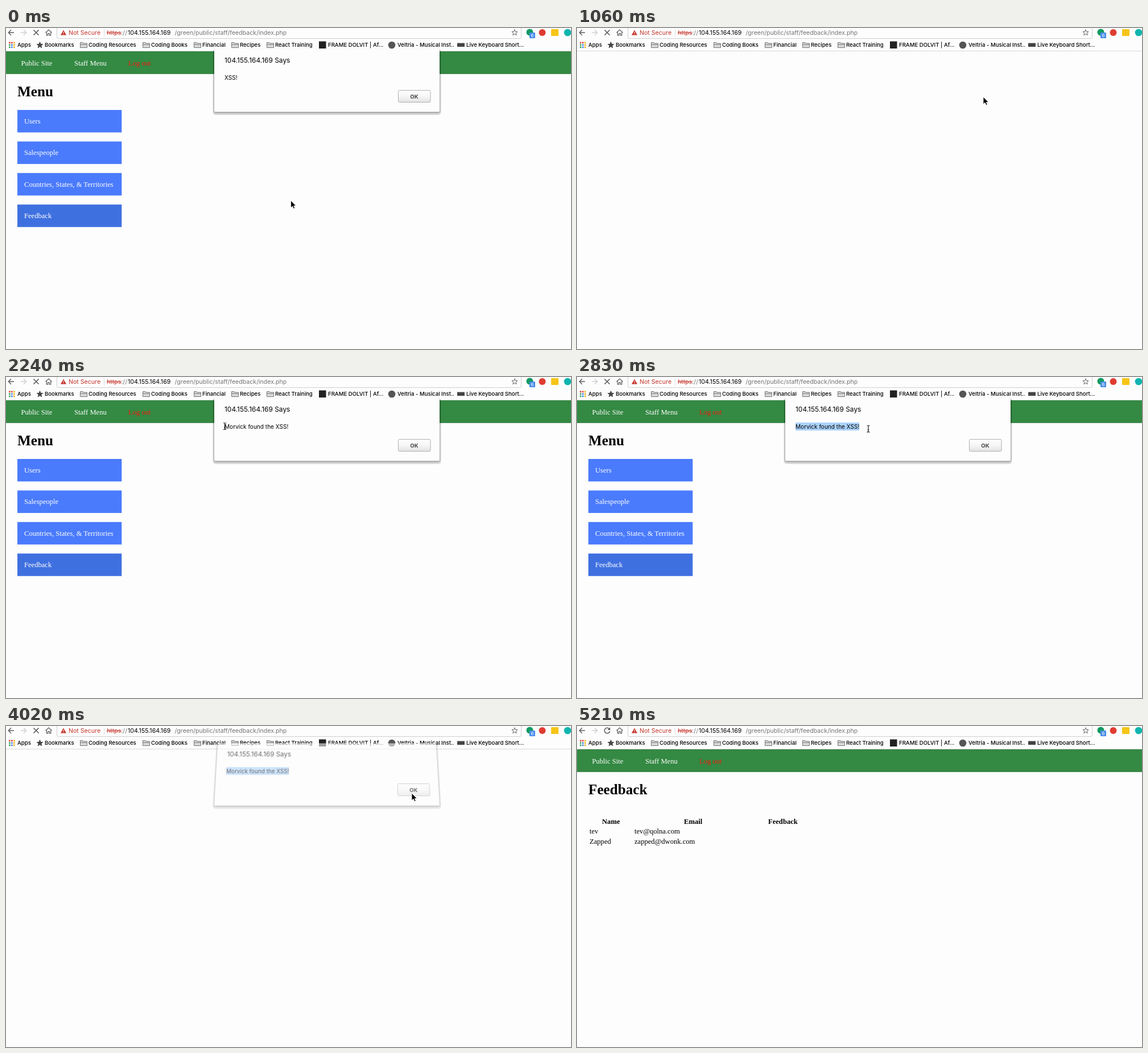
Animation, 993 px wide and 564 px high, one loop 6.12 s. Source, as an HTML page:

```html
<!DOCTYPE html>
<html lang="en">
<head>
<meta charset="utf-8">
<title>Script alert demo</title>
<style>
  html, body { margin: 0; width: 993px; height: 564px; overflow: hidden; background: #fdfdfd; }
  svg { position: absolute; left: 0; top: 0; overflow: hidden; }
  text { white-space: pre; }
  .ui { font-family: Inter, Roboto, sans-serif; }
  .serif { font-family: "Liberation Serif", "Times New Roman", serif; font-size: 12.6px; }
  .bold { font-weight: 700; }
  .title { font-size: 25.2px; font-weight: 700; }
  .mark { font-size: 9.6px; font-weight: 500; }
  .url { font-size: 10.6px; }
  #sheet { left: 356px; top: 27px; transform-origin: 208px 120px; }
</style>
</head>
<body>
<svg id="page" width="993" height="564" viewBox="0 0 993 564"></svg>
<svg id="sheet" width="416" height="136" viewBox="356 27 416 136">
  <defs>
    <linearGradient id="face" x1="0" y1="0" x2="0" y2="1">
      <stop offset="0" stop-color="#fefefe"/>
      <stop offset=".5" stop-color="#f6f6f6"/>
      <stop offset="1" stop-color="#e2e2e2"/>
    </linearGradient>
    <filter id="soft" x="-5%" y="-10%" width="110%" height="125%"><feGaussianBlur stdDeviation="1.6"/></filter>
  </defs>
  <rect x="363.5" y="37" width="401" height="116" rx="5" fill="#000" opacity=".13"/>
  <rect x="366" y="39" width="396" height="109.5" rx="2" fill="#000" opacity=".5" filter="url(#soft)"/>
  <rect x="366" y="37" width="396" height="110.5" rx="2" fill="#fdfdfd"/>
  <g class="ui">
    <text x="384" y="61" font-size="11.95">104.155.164.169 Says</text>
    <rect id="selection" x="384" y="80" height="14" fill="#abd2fb"/>
    <text id="message" x="384" y="91" font-size="10.1"></text>
    <rect x="689.5" y="109.5" width="56.5" height="21" rx="2" fill="url(#face)" stroke="#b0b0b0"/>
    <text id="ok" x="717.5" y="124" font-size="9.6" class="bold" text-anchor="middle">OK</text>
  </g>
</svg>
<svg id="pointer" width="993" height="564" viewBox="0 0 993 564">
  <path id="arrow" d="M0 0V13L3 10.2L5.1 14.6L7.3 13.6L5.3 9.4H9.3Z" fill="#000" stroke="#fff" stroke-width=".9"/>
  <path id="beam" d="M-2.6 -6Q-.4 -6 0 -4.8Q.4 -6 2.6 -6M0 -5V5M-2.6 6Q-.4 6 0 4.8Q.4 6 2.6 6M-1.5 2H1.5" fill="none" stroke="#222" stroke-width="1.2"/>
</svg>
<script>
const LOOP = 6120, STEP = 149;
const $ = id => document.getElementById(id);
const show = (id, on) => { $(id).style.display = on ? "" : "none"; };

const text = (x, y, cls, str, fill = "#000") =>
  `<text x="${x}" y="${y}" class="${cls}" fill="${fill}">${str.replace(/&/g, "&amp;")}</text>`;
const rect = (x, y, w, h, fill, extra = "") =>
  `<rect x="${x}" y="${y}" width="${w}" height="${h}" fill="${fill}" ${extra}/>`;
const dot = (x, y, r, fill) => `<circle cx="${x}" cy="${y}" r="${r}" fill="${fill}"/>`;
const line = (d, color, width = 1.4) =>
  `<path d="${d}" fill="none" stroke="${color}" stroke-width="${width}"/>`;

function star(cx, cy, r, fill, stroke) {
  const points = Array.from({ length: 10 }, (_, i) => {
    const a = i * Math.PI / 5, d = i % 2 ? r * 0.42 : r;
    return `${(cx + d * Math.sin(a)).toFixed(1)},${(cy - d * Math.cos(a)).toFixed(1)}`;
  });
  return `<polygon points="${points.join(" ")}" fill="${fill}" stroke="${stroke}"/>`;
}

const folder = x =>
  `<path d="M${x + .5} 34.5V25.5H${x + 5}L${x + 6.2} 27H${x + 12.5}V34.5Z" fill="#d8d8d8" stroke="#777"/>` +
  line(`M${x + 1} 29H${x + 12}`, "#777", 1);

function toolbar() {
  const gray = "#5a5a5a";
  const appColors = ["#e0473a", "#e0473a", "#f2b51d", "#3aa757", "#4285f4", "#f2b51d", "#3aa757", "#4285f4", "#f2b51d"];
  const folders = [[130, "Coding Resources"], [240, "Coding Books"], [330, "Financial"], [396, "Recipes"], [458, "React Training"]];
  return rect(0, 0, 993, 41, "#fdfdfd") + rect(0, 40, 993, 1, "#d9d9d9") +
    line("M14 8H4.5M9 3.2L4.3 8L9 12.8", gray) +
    line("M26 8H35.5M31 3.2L35.7 8L31 12.8", "#cfcfcf") +
    `<g id="stop">${line("M48.5 3.5L57.5 12.5M57.5 3.5L48.5 12.5", gray, 1.6)}</g>` +
    `<g id="reload">${line("M57 5.2A4.8 4.8 0 1 0 57.8 9", gray, 1.5)}<path d="M58.3 2.2V7H53.5Z" fill="${gray}"/></g>` +
    line("M69.5 8.2L75 3L80.5 8.2M71.3 7.5V12.8H73.7V9.5H76.3V12.8H78.7V7.5", gray, 1.2) +
    line("M89.5 0V16Q89.5 18.5 92 18.5H903Q905.5 18.5 905.5 16V0", "#cfcfcf", 1) +
    `<path d="M101 3.5L106 12.5H96Z" fill="#c5352b"/>` + rect(100.5, 6.5, 1, 3, "#fff") + rect(100.5, 10.3, 1, 1, "#fff") +
    text(110, 12, "ui url", "Not Secure", "#c5352b") + rect(172, 2, 1, 13, "#ddd") +
    `<text x="177" y="12" class="ui url" fill="#777"><tspan fill="#c5352b" text-decoration="line-through">https</tspan>://</text>` +
    text(214, 12, "ui url", "104.155.164.169") +
    text(296.5, 12, "ui url", "/green/public/staff/feedback/index.php", "#757575") +
    star(894, 8.2, 5.4, "none", "#666") +
    dot(920.5, 7.5, 6, "#129a63") + rect(920, 8, 10, 10, "#4a8ee8", 'rx="1"') +
    `<text x="925" y="16" class="ui" font-size="8" fill="#fff" text-anchor="middle">6</text>` +
    dot(942.5, 8, 6, "#e03c31") + rect(958, 2, 13, 12, "#f5c518", 'rx="1"') + dot(987, 8, 6.3, "#0fb5ae") +
    appColors.map((c, i) => rect(5 + i % 3 * 4, 24.5 + Math.floor(i / 3) * 4, 2.7, 2.7, c)).join("") +
    text(20, 33.3, "ui mark", "Apps") +
    star(59.5, 30.2, 5.6, "#444", "#444") + text(68, 33.3, "ui mark", "Bookmarks") +
    folders.map(([x, name]) => folder(x) + text(x + 15, 33.3, "ui mark", name)).join("") +
    rect(550, 23.5, 12.5, 12.5, "#222") + text(566, 33.3, "ui mark", "FRAME DOLVIT | Af...") +
    dot(678, 30, 6.3, "#555") + text(688, 33.3, "ui mark", "Veltria - Musical Inst..") +
    rect(793, 26.5, 13, 6.5, "#444") + text(809, 33.3, "ui mark", "Live Keyboard Short...");
}

function siteHeader() {
  return rect(0, 41, 993, 39.5, "#348943") + rect(0, 80, 993, 1, "#2f7a3c", 'opacity=".7"') +
    text(26.5, 66, "serif", "Public Site", "#fff") +
    text(120, 66, "serif", "Staff Menu", "#fff") +
    text(215, 66, "serif", "Log out", "#f21a0c");
}

function menu() {
  const items = ["Users", "Salespeople", "Countries, States, & Territories", "Feedback"];
  return text(20, 120, "serif title", "Menu") + items.map((name, i) => {
    const y = 144 + i * 55.4;
    return rect(20, y, 183.3, 39.5, i === 3 ? "#3f70e0" : "#4a7bfc") + text(32, y + 23.8, "serif", name, "#fff");
  }).join("");
}

function feedback() {
  const heads = [[44, "Name"], [188, "Email"], [336, "Feedback"]];
  const rows = [["tev", "tev@qolna.com"], ["Zapped", "zapped@dwonk.com"]];
  return text(20, 120, "serif title", "Feedback") +
    heads.map(([x, name]) => text(x, 171.7, "serif bold", name)).join("") +
    rows.map(([name, mail], i) => {
      const y = 189.2 + i * 17.4;
      return text(22, y, "serif", name) + text(101, y, "serif", mail);
    }).join("");
}

$("page").innerHTML = rect(0, 0, 993, 564, "#fdfdfd") + toolbar() +
  `<g id="header">${siteHeader()}</g><g id="menu">${menu()}</g><g id="feedback">${feedback()}</g>`;

const smooth = p => p * p * (3 - 2 * p);
const easeIn = p => p ** 1.5;

// Each move: start, end, target x, target y, easing
const moves = [
  [0, 745, 714, 121, smooth],
  [1192, 2235, 384.5, 86.5, smooth],
  [2384, 2831, 512, 91, smooth],
  [3278, 3874, 713, 118, smooth],
  [4470, 5066, 967, 549, easeIn]
];

function pointerAt(t) {
  let x = 500.5, y = 303;
  for (const [start, end, tx, ty, ease] of moves) {
    const p = ease(Math.min(1, Math.max(0, (t - start) / (end - start))));
    x += (tx - x) * p;
    y += (ty - y) * p;
  }
  return { x, y };
}

const within = (t, a, b) => t >= a && t < b;

function draw(t) {
  const { x, y } = pointerAt(Math.floor((t + 20) / STEP) * STEP);
  const onMenu = t < 1060 || within(t, 1210, 3280);
  const loaded = t >= 4310;
  const closing = within(t, 910, 1060) || within(t, 4010, 4160);

  show("header", onMenu || loaded);
  show("menu", onMenu);
  show("feedback", loaded);
  show("stop", !loaded);
  show("reload", loaded);

  show("sheet", t < 1060 || within(t, 1210, 4160));
  $("sheet").style.opacity = closing ? 0.57 : 1;
  $("sheet").style.transform = closing
    ? "matrix3d(1,0,0,0, 0,1.027,0,-.0003, 0,0,1,0, 0,-7.5,0,1)" : "none";
  $("message").textContent = t < 1060 ? "XSS!" : "Morvick found the XSS!";
  $("selection").setAttribute("width", within(t, 2500, 4160) ? Math.min(112, Math.max(0, t < 3280 ? x - 384 : 112)) : 0);
  const hover = x > 689 && x < 746 && y > 109 && y < 131;
  $("ok").setAttribute("fill", hover ? "#000" : "#444");

  const beam = within(t, 1940, 3500);
  show("beam", beam);
  show("arrow", !beam && t < 5210);
  $(beam ? "beam" : "arrow").setAttribute("transform", `translate(${x.toFixed(1)} ${y.toFixed(1)})`);
}

const began = performance.now();
function tick() {
  draw((performance.now() - began) % LOOP);
  requestAnimationFrame(tick);
}
tick();
</script>
</body>
</html>
```
